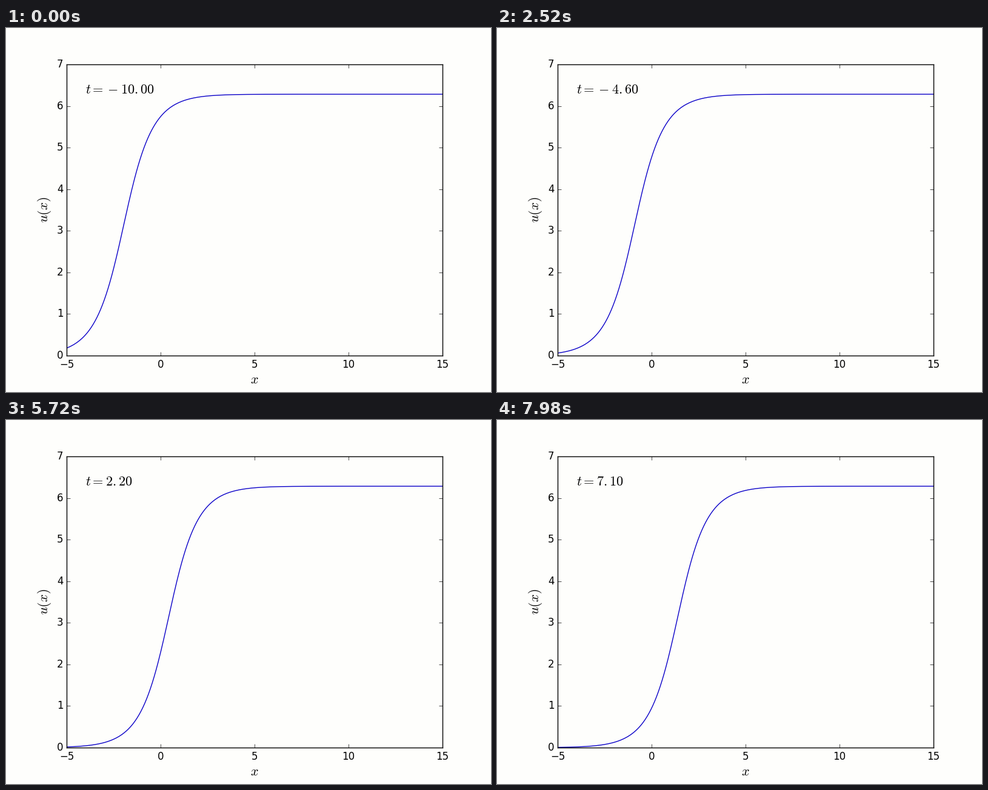
These frames come from a looping animation (800 px wide and 600 px high, 8000 ms). A matplotlib script:

```python
import numpy as np
import matplotlib.pyplot as plt
from matplotlib.animation import FuncAnimation

TICK_MS = 20          # smallest display time
TICKS = 400           # 8000 ms loop
HOLD = (0, 1, 1, 1, 1, 1, 2)   # three steps shown for 20, 100 and 20 ms
DRIFT = 0.2           # momentum of the kink: gamma times velocity
PAPER = "#fefefc"

plt.rcParams.update({
    "font.family": "DejaVu Sans",
    "font.size": 12,
    "mathtext.fontset": "cm",
    "axes.linewidth": 1.0,
    "ytick.alignment": "center",
})

fig = plt.figure(figsize=(8, 6), dpi=100, facecolor=PAPER)
ax = fig.add_axes([0.125, 0.1, 0.775, 0.8], facecolor=PAPER)
ax.set_xlim(-5, 15)
ax.set_ylim(0, 7)
ax.set_xticks(range(-5, 16, 5))
ax.set_yticks(range(8))
ax.tick_params(direction="in", top=True, right=True, length=4, width=0.5,
               pad=4)


def label(px, py, text, **kw):
    """Place a math label by its baseline, in pixels from the top left."""
    fig.text(px / 800, 1 - py / 600, text, fontsize=16, ha="center",
             va="baseline", rotation_mode="anchor", **kw)


label(410, 586, "$x$")
label(69, 300, "$u(x)$", rotation=90)

x = np.linspace(-5, 15, 400)
gamma = np.sqrt(1 + DRIFT ** 2)
curve, = ax.plot([], [], color="#0a00c8", lw=1.0)
clock = ax.text(-4, 6.3, "", fontsize=16)


def kink(t):
    """Travelling sine-Gordon kink."""
    return 4 * np.arctan(np.exp(gamma * x - DRIFT * t))


def clock_text(t):
    whole, frac = f"{abs(t):.2f}".split(".")
    sign = "{}-" if t < -0.001 else ""
    return f"$t={sign}{whole}{{.}}{frac}$"


def update(tick):
    step = 3 * (tick // 7) + HOLD[tick % 7]
    t = (step - 100) / 10
    curve.set_data(x, kink(t))
    clock.set_text(clock_text(t))
    return curve, clock


anim = FuncAnimation(fig, update, frames=TICKS, interval=TICK_MS,
                     repeat=True, repeat_delay=0, blit=False)
plt.show()
```
